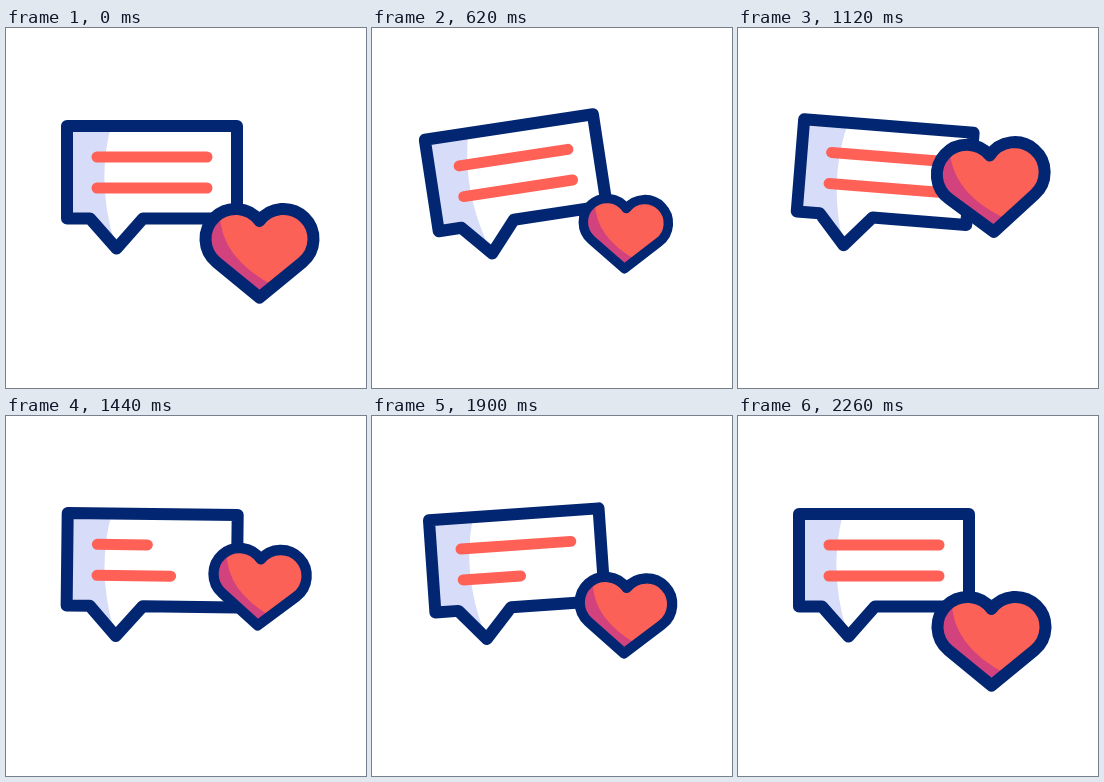
Write an HTML page that moves like this. It is 360 px wide and 360 px high and loops after 2400 ms.

```html
<!DOCTYPE html>
<html lang="en">
<head>
<meta charset="utf-8">
<title>Message with heart</title>
<style>
  html, body { margin: 0; width: 100%; height: 100%; overflow: hidden; background: #fff; }
  svg { display: block; width: 100%; height: 100%; }
  .outline { fill: none; stroke: #022672; stroke-width: 12; stroke-linejoin: round; }
  .line { stroke: #ff6157; stroke-width: 11; stroke-linecap: round; }
</style>
</head>
<body>
<svg viewBox="0 0 360 360">
  <defs>
    <path id="bubbleShape" d="M61 98H231V190.5H137L110.5 220.5L84 190.5H61Z"/>
    <path id="heartShape" d="M253.5 193A30 30 0 1 0 210.6 234.3L253.5 269.5L296.4 234.3A30 30 0 1 0 253.5 193Z"/>
    <clipPath id="bubbleClip"><use href="#bubbleShape"/></clipPath>
    <clipPath id="heartClip"><use href="#heartShape"/></clipPath>
  </defs>
  <g id="bubble">
    <use href="#bubbleShape" fill="#fff"/>
    <path clip-path="url(#bubbleClip)" fill="#d7ddf8" d="M55 98H105Q90 155 109 216L110 226H55Z"/>
    <path class="line" id="line1"/>
    <path class="line" id="line2"/>
    <use href="#bubbleShape" class="outline"/>
  </g>
  <g id="heart">
    <use href="#heartShape" fill="#fc6157"/>
    <path clip-path="url(#heartClip)" fill="#d2437e" d="M214 178Q210 228 268 258L254 276L190 240V178Z"/>
    <use href="#heartShape" class="outline"/>
  </g>
</svg>
<script>
const LOOP = 2400;
const TIP = { x: 253.5, y: 275.5 };

// Keys are [time, value] pairs.
const tilt = [[200, 0], [640, -8.7], [1180, 5], [1750, -5], [2260, 0]];
const rise = [[200, 0], [1140, -67], [1440, -61], [1820, -41], [1900, -33], [2260, 0]];
const size = [[200, 1], [680, .78], [1140, 1], [1660, .78], [2260, 1]];
const sway = [[200, 0], [460, 3.3], [990, -4], [1600, 4], [2260, 0]];
const lines = [
  { id: "line1", y: 129, keys: [[1240, 1], [1620, 0], [1880, 1]] },
  { id: "line2", y: 160, keys: [[1285, 1], [1685, 0], [2105, 1]] }
];

const linear = p => p;
const smooth = p => (1 - Math.cos(Math.PI * p)) / 2;
const set = (id, name, value) => document.getElementById(id).setAttribute(name, value);

function valueAt(keys, t, ease = smooth) {
  if (t <= keys[0][0]) return keys[0][1];
  for (let i = 1; i < keys.length; i++) {
    const [t0, a] = keys[i - 1], [t1, b] = keys[i];
    if (t < t1) return a + (b - a) * ease((t - t0) / (t1 - t0));
  }
  return keys[keys.length - 1][1];
}

function draw(t) {
  set("bubble", "transform", `rotate(${valueAt(tilt, t)} 148 159)`);
  for (const { id, y, keys } of lines) {
    set(id, "d", `M91 ${y}h${Math.max(.01, 110 * valueAt(keys, t))}`);
  }
  // The heart shrinks towards its tip and sways about its middle while it floats.
  const y = TIP.y + valueAt(rise, t, linear);
  set("heart", "transform",
    `translate(${TIP.x} ${y}) scale(${valueAt(size, t)}) translate(${-TIP.x} ${-TIP.y})` +
    ` rotate(${valueAt(sway, t)} ${TIP.x} 225)`);
}

const start = performance.now();
function tick() {
  draw((performance.now() - start) % LOOP);
  requestAnimationFrame(tick);
}
tick();
</script>
</body>
</html>
```
